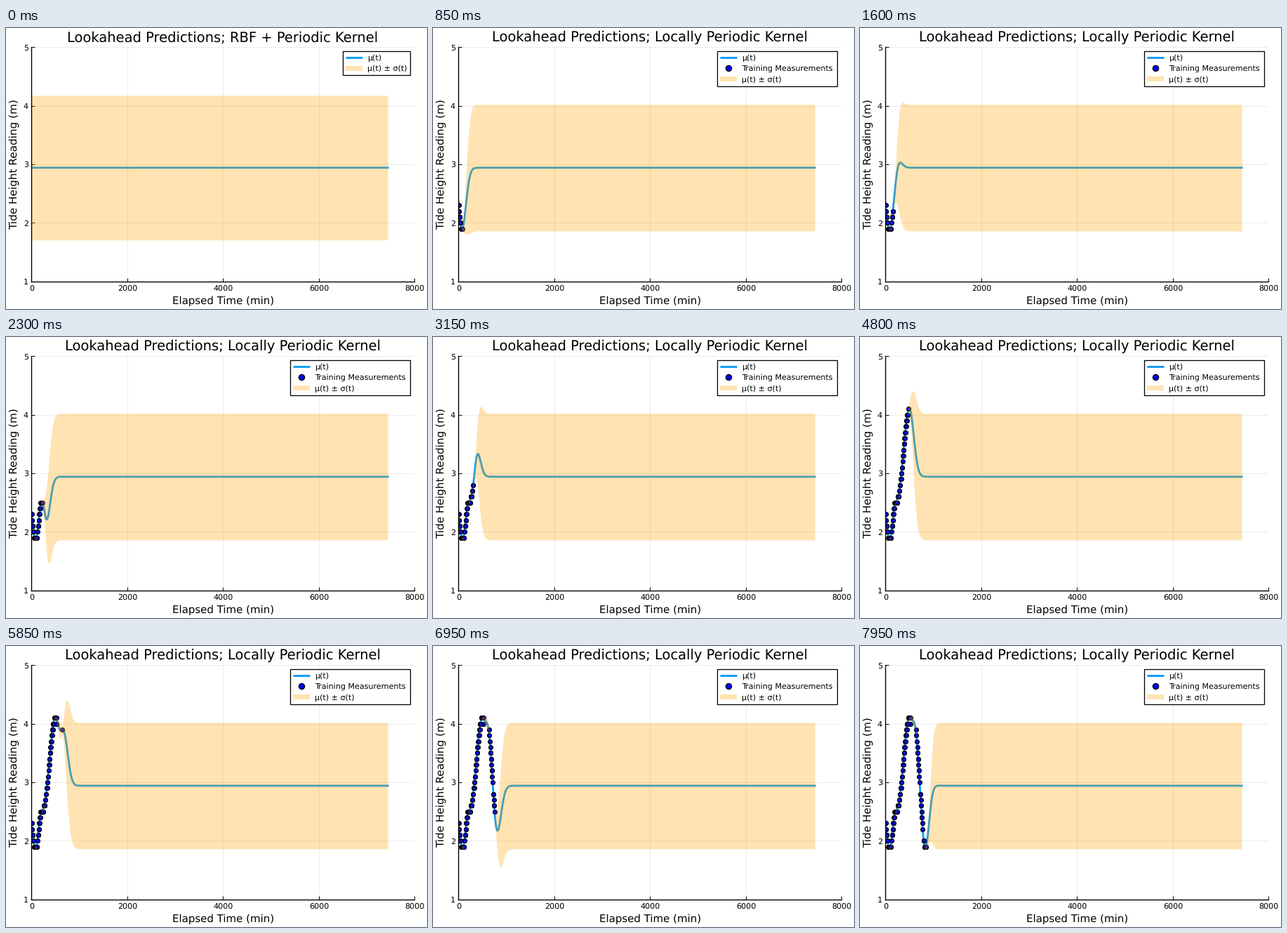
A matplotlib script for the animation above (8000 ms loop, 600 by 400 pixels).

```python
import numpy as np
import matplotlib.pyplot as plt
from matplotlib.animation import FuncAnimation
from matplotlib.patches import Rectangle

W, H, DPI = 600, 400, 100
PX = 72 / DPI
BLUE, ORANGE = "#009afa", "orange"
STEP_MS, STEPS = 50, 160

# Gaussian process settings
MEAN, SIGMA, ELL, NOISE = 2.94, 1.08, 92.0, 0.07
PRIOR_SIGMA = 1.235
GRID = np.arange(0, 7446, 5.0)

# Turning points of the tide (minutes, metres), joined by half cosines
TURNS = [(-50, 2.53), (88, 1.855), (225, 2.53), (240, 2.53), (505, 4.1),
         (535, 4.04), (590, 4.1), (846, 1.87), (900, 1.9)]
OUTAGES = [range(0, 2), range(25, 27), range(108, 117), range(146, 148)]


def tide(t):
    x, y = np.array(TURNS).T
    k = np.searchsorted(x, t, side="right") - 1
    u = (t - x[k]) / (x[k + 1] - x[k])
    return y[k] + (y[k + 1] - y[k]) * (1 - np.cos(np.pi * u)) / 2


def has_reading(i):
    return i % 12 not in (1, 11) and not any(i in gap for gap in OUTAGES)


def readings(step):
    idx = np.array([i for i in range(step + 1) if has_reading(i)], dtype=int)
    t = 5.0 * idx + 60 * (idx >= 117)
    return t, np.round(tide(t), 1)


def kernel(a, b):
    d = a[:, None] - b[None, :]
    return SIGMA**2 * np.exp(-0.5 * (d / ELL) ** 2)


def posterior(t, h):
    low = np.linalg.cholesky(kernel(t, t) + NOISE**2 * np.eye(len(t)))
    v = np.linalg.solve(low, kernel(t, GRID))
    mu = MEAN + v.T @ np.linalg.solve(low, h - MEAN)
    var = SIGMA**2 - (v**2).sum(axis=0)
    return mu, np.sqrt(np.maximum(var, 0))


plt.rcParams["font.family"] = "DejaVu Sans"
plt.rcParams["text.hinting"] = "none"
fig = plt.figure(figsize=(W / DPI, H / DPI), dpi=DPI, facecolor="white")

# Plot area in pixels, y downwards
LEFT, BASE, X_LEN, UNIT = 36, 360.6, 546, 83.35
ax = fig.add_axes([LEFT / W, 1 - BASE / H, X_LEN / W, 4 * UNIT / H])
ax.set(xlim=(0, 8000), ylim=(1, 5), xticks=range(0, 8001, 2000),
       yticks=range(1, 6))
ax.set_axisbelow(True)
ax.grid(color="black", alpha=0.075, lw=PX)
ax.tick_params(direction="in", length=5 * PX, width=PX, labelbottom=False,
               labelleft=False)
for side in ("top", "right"):
    ax.spines[side].set_visible(False)
for side in ("left", "bottom"):
    ax.spines[side].set_linewidth(1.4 * PX)

line, = ax.plot([], [], color=BLUE, lw=2.8 * PX, zorder=2.1)
dots, = ax.plot([], [], "o", ms=5.8 * PX, mfc="blue", mec="black",
                mew=1.3 * PX, zorder=2.2)
band = ax.fill_between(GRID, GRID * 0, GRID * 0, color=ORANGE, alpha=0.3,
                       lw=0, zorder=2.3)

# Labels and legend live in pixel coordinates
ui = fig.add_axes([0, 0, 1, 1], facecolor="none")
ui.set(xlim=(0, W), ylim=(H, 0))
ui.axis("off")


def label(x, y, s, size, ha="center", **kw):
    return ui.text(x, y, s, fontsize=size, ha=ha, va="baseline", **kw)


title = label(308.8, 19.3, "", 14.08)
label(310, 392.5, "Elapsed Time (min)", 10.85)
label(16, 194.3, "Tide Height Reading (m)", 11, rotation=90,
      rotation_mode="anchor")
for k in range(5):
    label(LEFT + 0.5 + X_LEN / 4 * k, 374, str(2000 * k), 8)
    label(32, 365 - UNIT * k, str(k + 1), 8, ha="right")


def legend(left, rows):
    bottom = 36 + 15.6 * len(rows)
    parts = [ui.add_patch(Rectangle((left, 33), 576 - left, bottom - 33,
                                    fc="white", ec="black", lw=1.3 * PX))]
    for k, name in enumerate(rows):
        y = 41.7 + 15.6 * k
        parts.append(label(left + 35, y + 3.7, name, 8.04, ha="left"))
        if name == "μ(t)":
            parts += ui.plot([left + 4, left + 28], [y, y], color=BLUE,
                             lw=2.8 * PX, solid_capstyle="butt")
        elif "±" in name:
            parts.append(ui.add_patch(Rectangle(
                (left + 4, y - 3.5), 23.5, 7, fc=ORANGE, alpha=0.3, lw=0)))
        else:
            parts += ui.plot([left + 15.5], [y], "o", ms=8.2 * PX, mfc="blue",
                             mec="black", mew=1.3 * PX)
    return parts


prior_legend = legend(480, ["μ(t)", "μ(t) ± σ(t)"])
full_legend = legend(405, ["μ(t)", "Training Measurements", "μ(t) ± σ(t)"])


def draw(step):
    t, h = readings(step)
    if len(t):
        mu, sd = posterior(t, h)
        kind = "Locally Periodic"
    else:
        mu, sd = np.full_like(GRID, MEAN), np.full_like(GRID, PRIOR_SIGMA)
        kind = "RBF + Periodic"
    title.set_text(f"Lookahead Predictions; {kind} Kernel")
    line.set_data(GRID, mu)
    dots.set_data(t, h)
    edge = np.concatenate([mu - sd, (mu + sd)[::-1]])
    band.set_verts([np.column_stack([np.r_[GRID, GRID[::-1]], edge])])
    for part in prior_legend:
        part.set_visible(len(t) == 0)
    for part in full_legend:
        part.set_visible(len(t) > 0)
    return []


anim = FuncAnimation(fig, draw, frames=STEPS, interval=STEP_MS, repeat=True,
                     repeat_delay=0, init_func=lambda: [])
plt.show()
```
